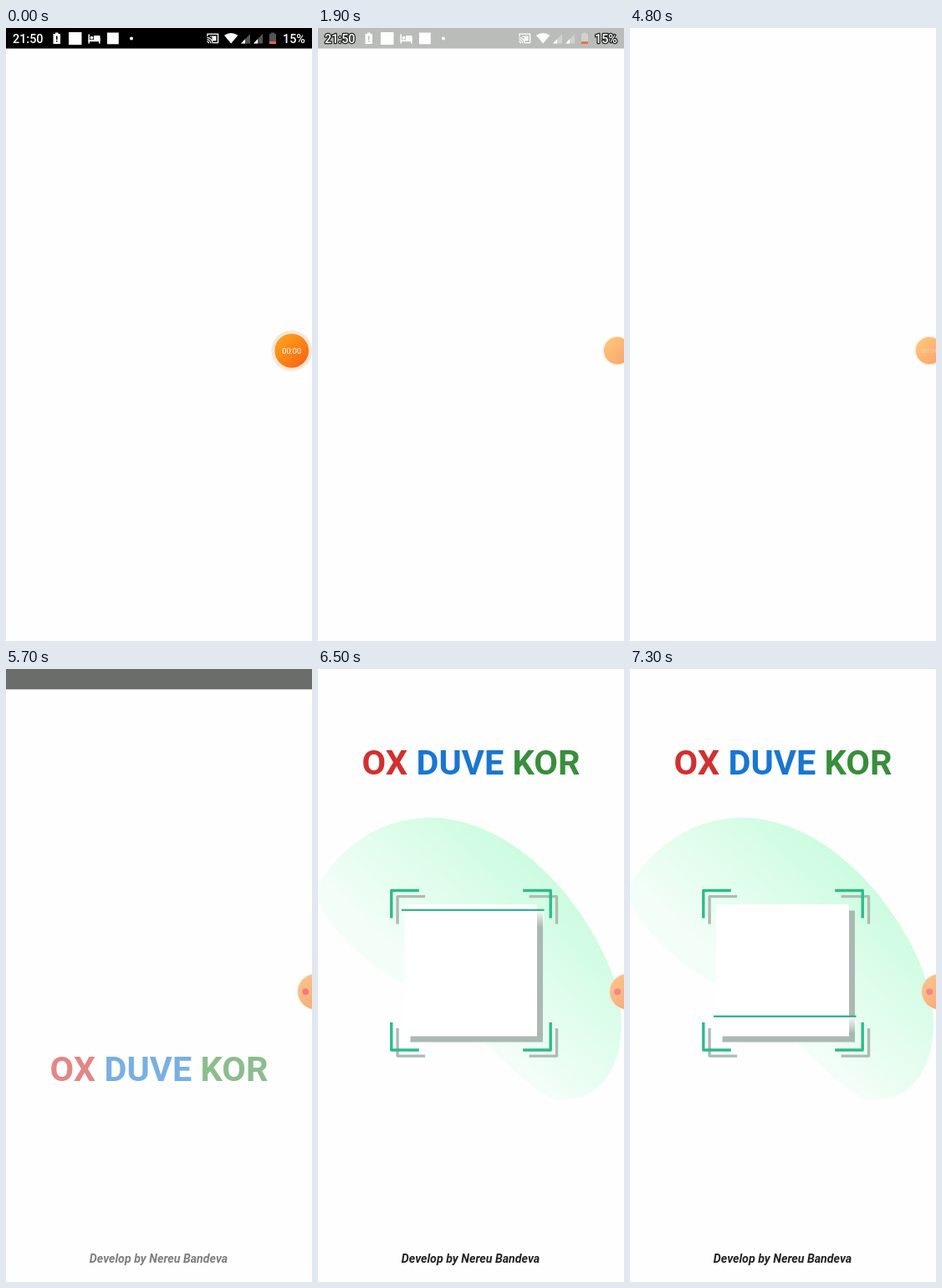
Recreate the animation shown at these times as an HTML page with a canvas. Size 366 by 732 pixels, loop 8000 ms.

```html
<!DOCTYPE html>
<html lang="en">
<head>
<meta charset="utf-8">
<title>Scanner splash</title>
<style>
  html, body { margin: 0; width: 100%; height: 100%; overflow: hidden; background: #fdfefd; }
  canvas { display: block; width: 366px; height: 732px; }
</style>
</head>
<body>
<canvas id="stage"></canvas>
<script>
const W = 366, H = 732, LOOP = 8000, STEP = 100;
const canvas = document.getElementById('stage');
const ctx = canvas.getContext('2d');
const ratio = window.devicePixelRatio || 1;
canvas.width = W * ratio;
canvas.height = H * ratio;

const clamp = v => Math.min(1, Math.max(0, v));
const span = (t, from, to) => clamp((t - from) / (to - from));
const mix = (a, b, p) => a + (b - a) * p;

function rect(x, y, w, h, color) {
  ctx.fillStyle = color;
  ctx.fillRect(x, y, w, h);
}

function disc(x, y, r, color) {
  ctx.fillStyle = color;
  ctx.beginPath();
  ctx.arc(x, y, r, 0, Math.PI * 2);
  ctx.fill();
}

function poly(points, color) {
  ctx.fillStyle = color;
  ctx.beginPath();
  points.forEach(([x, y]) => ctx.lineTo(x, y));
  ctx.fill();
}

function line(points, color, width) {
  ctx.strokeStyle = color;
  ctx.lineWidth = width;
  ctx.beginPath();
  points.forEach(([x, y]) => ctx.lineTo(x, y));
  ctx.stroke();
}

function text(str, x, y, font, color, align = 'left') {
  ctx.font = font + ' Roboto, sans-serif';
  ctx.textAlign = align;
  ctx.fillStyle = color;
  ctx.fillText(str, x, y);
}

function faded(alpha, draw) {
  ctx.save();
  ctx.globalAlpha = alpha;
  draw();
  ctx.restore();
}

// Status bar

function barLabel(str, x, outlined) {
  const font = '500 14.4px';
  if (outlined) {
    ctx.font = font + ' Roboto, sans-serif';
    ctx.textAlign = 'left';
    ctx.lineJoin = 'round';
    ctx.lineWidth = 2.6;
    ctx.strokeStyle = '#222';
    ctx.strokeText(str, x, 18);
  }
  text(str, x, 18, font, '#fff');
}

function castIcon(bg) {
  ctx.strokeStyle = '#fff';
  ctx.lineWidth = 1.3;
  ctx.strokeRect(241, 7.2, 12.6, 10.4);
  rect(239.5, 10, 8, 9, bg);
  rect(244, 9.5, 7.5, 5.8, '#fff');
  rect(239.5, 10.5, 7, 8.5, bg);
  for (const r of [2, 4.4, 6.8]) {
    ctx.beginPath();
    ctx.arc(240.4, 18.2, r, -Math.PI / 2, 0);
    ctx.stroke();
  }
}

function statusBar(dark) {
  const bg = dark ? '#000' : '#babcba';
  const dim = dark ? '#555' : '#d0d1d0';
  rect(0, 0, W, 24.5, bg);
  barLabel('21:50', 8, !dark);

  rect(56.5, 7, 8.5, 12, '#fff');
  rect(59, 5.5, 3.5, 2, '#fff');
  rect(60, 9.5, 1.5, 4.5, bg);
  rect(60, 15, 1.5, 1.5, bg);

  rect(75, 5, 15.5, 15, '#fff');

  rect(98.5, 7.5, 1.5, 11, '#fff');
  rect(98.5, 14, 14, 2.2, '#fff');
  rect(111, 12, 1.5, 6.5, '#fff');
  rect(105, 9, 7.5, 5, '#fff');
  disc(102.5, 11.7, 1.9, '#fff');

  rect(121, 5.5, 13.8, 13.8, '#fff');
  disc(150, 12.5, 2, '#fff');

  castIcon(bg);
  ctx.fillStyle = '#fff';
  ctx.beginPath();
  ctx.moveTo(269.2, 18.5);
  ctx.lineTo(261, 8.8);
  ctx.quadraticCurveTo(269.2, 3, 277.4, 8.8);
  ctx.fill();

  for (const x of [281, 296]) {
    poly([[x, 18.5], [x + 11, 18.5], [x + 11, 7]], dim);
    poly([[x, 18.5], [x + 5, 18.5], [x + 5, 13.2]], '#fff');
  }

  rect(315, 7, 8, 12, dim);
  rect(317, 5.5, 4, 2, dim);
  rect(315, 16.2, 8, 2.8, '#f4693c');
  barLabel('15%', 331, !dark);
}

// Floating record button

function button(x, r, alpha, halo, from, to) {
  const y = 385.3;
  disc(x, y, r + halo, `rgba(250,225,205,${0.75 * alpha})`);
  const g = ctx.createLinearGradient(x - r * 0.7, y - r * 0.7, x + r * 0.7, y + r * 0.7);
  g.addColorStop(0, from);
  g.addColorStop(1, to);
  disc(x, y, r, '#fdfefd');
  faded(alpha, () => disc(x, y, r, g));
}

function recorder(t) {
  if (t < 5500) {
    const p = span(t, 1400, 1900);
    const x = mix(341.7, 358, p);
    button(x, mix(20.4, 16.2, p), mix(1, 0.6, p), mix(4, 1.6, p), '#fc9f1d', '#f96a14');
    const clock = t < 1000 ? '00:00' : t < 4300 ? '00:01' : '00:04';
    if (t < 1900) {
      faded(1 - p, () => text(clock, x, 388.6, '400 9.2px', '#fff', 'center'));
    } else if (t >= 4300) {
      faded(0.35, () => text(clock, 358, 388, '400 7.4px', '#fff', 'center'));
    }
    return;
  }
  const p = span(t, 5400, 5600);
  button(mix(358, 370, p), mix(16.2, 21, p), 0.58, 1.2, '#f79536', '#f2691c');
  faded(t < 6500 ? 0.95 : 0.75, () => disc(358.3, 385.3, 3.9, '#f6757c'));
}

// Splash screen

function title(baseline) {
  const words = [['OX ', '#d32f2f'], ['DUVE ', '#1976d2'], ['KOR', '#388e3c']];
  const font = '700 41.5px';
  ctx.font = font + ' Roboto, sans-serif';
  const widths = words.map(([w]) => ctx.measureText(w).width);
  let x = W / 2 - widths.reduce((a, b) => a + b) / 2;
  words.forEach(([w, color], i) => {
    text(w, x, baseline, font, color);
    x += widths[i];
  });
}

function credit() {
  text('Develop by Nereu Bandeva', 182.5, 708.5, 'italic 700 14.2px', '#212121', 'center');
}

function blob() {
  const g = ctx.createLinearGradient(135, 385, 275, 232);
  g.addColorStop(0, '#f4fef8');
  g.addColorStop(0.5, '#dffdec');
  g.addColorStop(1, '#cafcdf');
  ctx.fillStyle = g;
  ctx.beginPath();
  ctx.moveTo(-4, 268);
  ctx.bezierCurveTo(20, 215, 75, 177, 135, 177.5);
  ctx.bezierCurveTo(217, 179, 290, 245, 333, 323);
  ctx.bezierCurveTo(352, 358, 363, 392, 363, 426);
  ctx.bezierCurveTo(361, 492, 322, 523, 280, 513);
  ctx.bezierCurveTo(225, 482, 190, 425, 130, 392);
  ctx.bezierCurveTo(70, 360, 20, 325, -4, 268);
  ctx.fill();
}

function corners(dx, dy, color) {
  const arm = 33;
  for (const [x, y, sx, sy] of [[87.8, 264.5, 1, 1], [278.2, 264.5, -1, 1], [87.8, 455, 1, -1], [278.2, 455, -1, -1]]) {
    const cx = x + dx, cy = y + dy;
    line([[cx, cy + sy * arm], [cx, cy], [cx + sx * arm, cy]], color, 3.4);
  }
}

function scanner(t) {
  blob();
  corners(7.3, 7.1, '#aebbb5');
  corners(0, 0, '#2dbb8b');
  rect(110.5, 288.5, 158.5, 157, '#aab9b2');
  rect(103, 281, 159, 157.5, '#fff');

  const y = mix(287.8, 414.8, span(t, 6500, 7300));
  const glow = ctx.createLinearGradient(0, y, 0, y + 20);
  glow.addColorStop(0, 'rgba(255,255,255,.95)');
  glow.addColorStop(1, 'rgba(255,255,255,0)');
  rect(103, y, 167, 20, glow);
  rect(100, y - 1.1, 170.5, 2.2, '#2bb386');
}

function splash(t) {
  if (t >= 6500) {
    scanner(t);
    title(125.6);
    credit();
    return;
  }
  const alpha = 1 - (1 - span(t, 5400, 6000)) ** 1.25;
  faded(alpha, () => {
    if (t < 6200) rect(0, 0, W, 24.3, '#030603');
    title(492);
    credit();
  });
}

function render(t) {
  ctx.setTransform(ratio, 0, 0, ratio, 0, 0);
  rect(0, 0, W, H, '#fdfefd');
  if (t < 4300) {
    statusBar(t < 1200);
  } else if (t < 4800) {
    // Fade the bar by covering it, so overlapping strokes stay clean.
    statusBar(false);
    faded(span(t, 4300, 4800), () => rect(0, 0, W, 25, '#fdfefd'));
  }
  if (t >= 5500) splash(t);
  recorder(t);
}

const start = performance.now();
function tick() {
  const t = (performance.now() - start) % LOOP;
  render(Math.floor(t / STEP) * STEP);
  requestAnimationFrame(tick);
}
tick();
</script>
</body>
</html>
```
